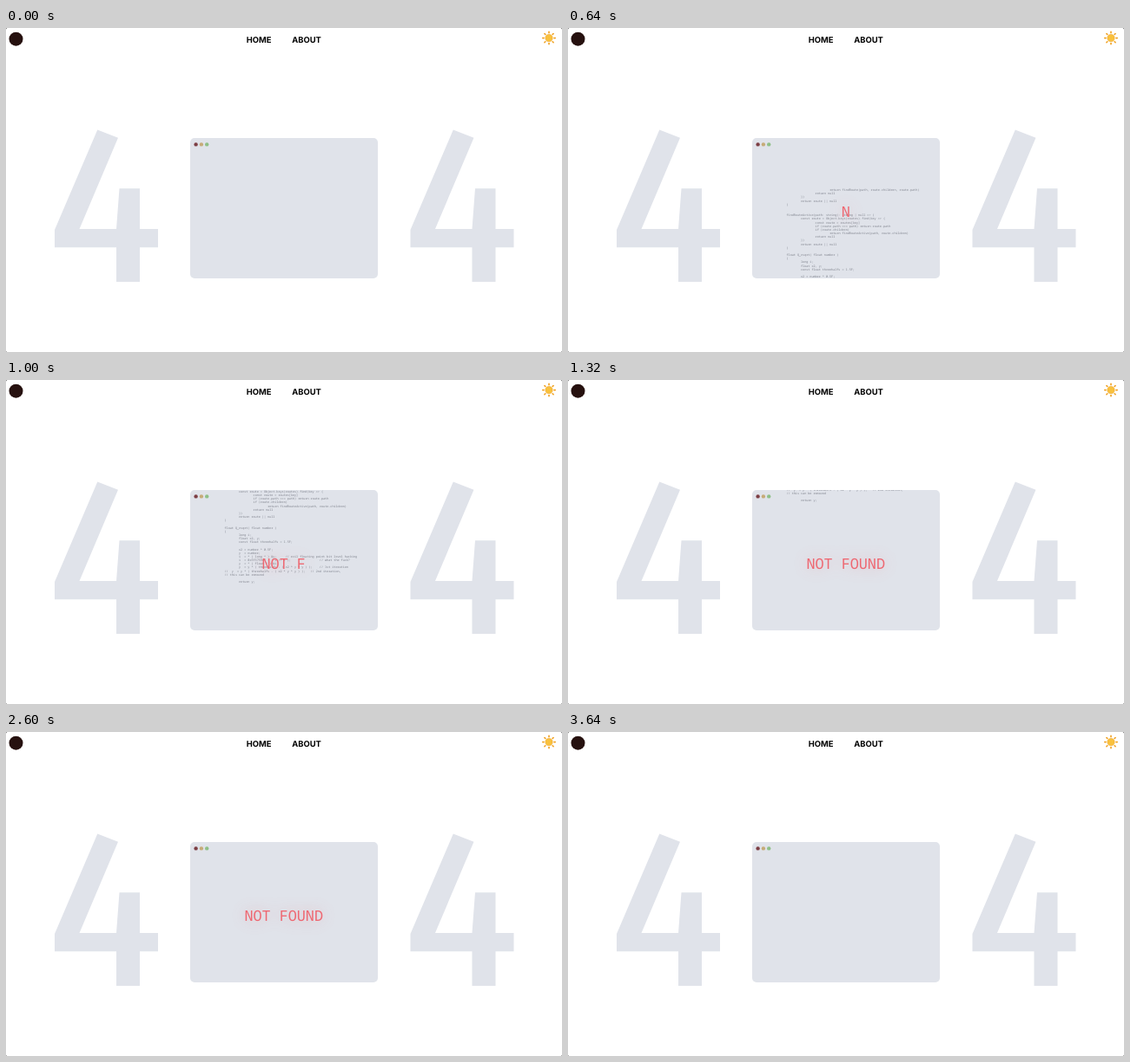
Animation, 640 px wide and 374 px high, one loop 3.68 s. Source, as an HTML page:

```html
<!DOCTYPE html>
<html lang="en">
<head>
<meta charset="utf-8">
<title>Not found</title>
<style>
  html, body { margin: 0; width: 100%; height: 100%; overflow: hidden; background: #fff; }
  svg { display: block; width: 100%; height: 100%; }
  text { white-space: pre; text-rendering: geometricPrecision; }
  .nav { font: 700 9.4px Inter, sans-serif; text-anchor: middle; }
  .code { font: 3.45px "Noto Sans Mono", monospace; fill: #7d818b; }
  .msg { font: 500 16.8px "Noto Sans Mono", monospace; fill: #ee6670; text-anchor: middle; }
  .glow { filter: blur(9px); opacity: .35; }
</style>
</head>
<body>
<svg viewBox="0 0 640 374">
  <defs>
    <clipPath id="win"><rect x="212" y="127" width="216" height="162" rx="5"/></clipPath>
    <path id="four" fill="#e0e3ea" d="M105.3 117.5 129 126.7 84.5 232H127L130.5 185.3H154V232H175V253.2H154V293H127V253.2H56V233Z"/>
  </defs>
  <rect width="640" height="374" fill="#333"/>
  <rect width="640" height="374" rx="1.5" fill="#fff"/>

  <circle cx="11.5" cy="12.7" r="8" fill="#26110f"/>
  <text class="nav" x="291" y="16.5">HOME</text>
  <text class="nav" x="346" y="16.5">ABOUT</text>
  <g transform="translate(625 11.6)">
    <g id="rays" stroke="#f0a020" stroke-width="1.6" stroke-linecap="round"></g>
    <circle r="4.1" fill="#f9c13d" stroke="#eda52a" stroke-width=".6"/>
  </g>

  <use href="#four"/>
  <use href="#four" x="409.5"/>
  <rect x="212" y="127" width="216" height="162" rx="5" fill="#e0e3ea"/>
  <g clip-path="url(#win)">
    <g id="code" class="code"></g>
    <g id="msg">
      <text class="msg glow" x="319.7" y="217.7"></text>
      <text class="msg" x="319.7" y="217.7"></text>
    </g>
  </g>
  <circle cx="218.6" cy="134.4" r="2.2" fill="#7d3f45"/>
  <circle cx="224.9" cy="134.4" r="2.2" fill="#c6ab78"/>
  <circle cx="231.2" cy="134.4" r="2.2" fill="#8fc088"/>
</svg>
<script>
const LOOP = 3680, STEP = 40;
const PITCH = 4.17, COLUMN = 2.07, LEFT = 251.5;
const MESSAGE = "NOT FOUND";
const CODE = `\t\t\treturn findRoute(path, route.children, route.path)
\t\treturn null
\t})
\treturn route || null
}


findRouteActive(path: string): string | null => {
\tconst route = Object.keys(routes).find(key => {
\t\tconst route = routes[key]
\t\tif (route.path === path) return route.path
\t\tif (route.children)
\t\t\treturn findRouteActive(path, route.children)
\t\treturn null
\t})
\treturn route || null
}

float Q_rsqrt( float number )
{
\tlong i;
\tfloat x2, y;
\tconst float threehalfs = 1.5F;

\tx2 = number * 0.5F;
\ty  = number;
\ti  = * ( long * ) &y;     // evil floating point bit level hacking
\ti  = 0x5f3759df - ( i >> 1 );                // what the fuck?
\ty  = * ( float * ) &i;
\ty  = y * ( threehalfs - ( x2 * y * y ) );    // 1st iteration
//  y  = y * ( threehalfs - ( x2 * y * y ) );   // 2nd iteration,
// this can be removed

\treturn y;`;

const byId = id => document.getElementById(id);
const clamp = v => Math.max(0, Math.min(1, v));

function add(parent, tag, attrs, content = "") {
  const el = document.createElementNS("http://www.w3.org/2000/svg", tag);
  for (const key in attrs) el.setAttribute(key, attrs[key]);
  el.textContent = content;
  parent.appendChild(el);
}

const code = byId("code"), msg = byId("msg");

CODE.split("\n").forEach((line, i) => {
  const body = line.replace(/^\t+/, "");
  const indent = (line.length - body.length) * 8;
  if (body) add(code, "text", { x: LEFT + indent * COLUMN, y: i * PITCH + 1 }, body);
});

for (let a = 0; a < 360; a += 45)
  add(byId("rays"), "line", { y1: -5.9, y2: -7.2, transform: `rotate(${a})` });

// Vertical place of the first code line; the scroll speeds up slightly.
function scrollY(t) {
  const d = t - 640;
  return 187 - 0.2332 * d - 0.0000582 * d * d;
}

function draw(t) {
  code.setAttribute("transform", `translate(0 ${scrollY(t).toFixed(2)})`);
  const count = Math.max(0, Math.floor((t - 620) / 85) + 1);
  const typed = MESSAGE.slice(0, count).trim();
  for (const el of msg.children)
    if (el.textContent !== typed) el.textContent = typed;
  msg.setAttribute("opacity", 1 - clamp((t - 3180) / 420));
}

const start = performance.now();
function tick() {
  const t = (performance.now() - start) % LOOP;
  draw(Math.floor(t / STEP) * STEP);
  requestAnimationFrame(tick);
}
tick();
</script>
</body>
</html>
```
